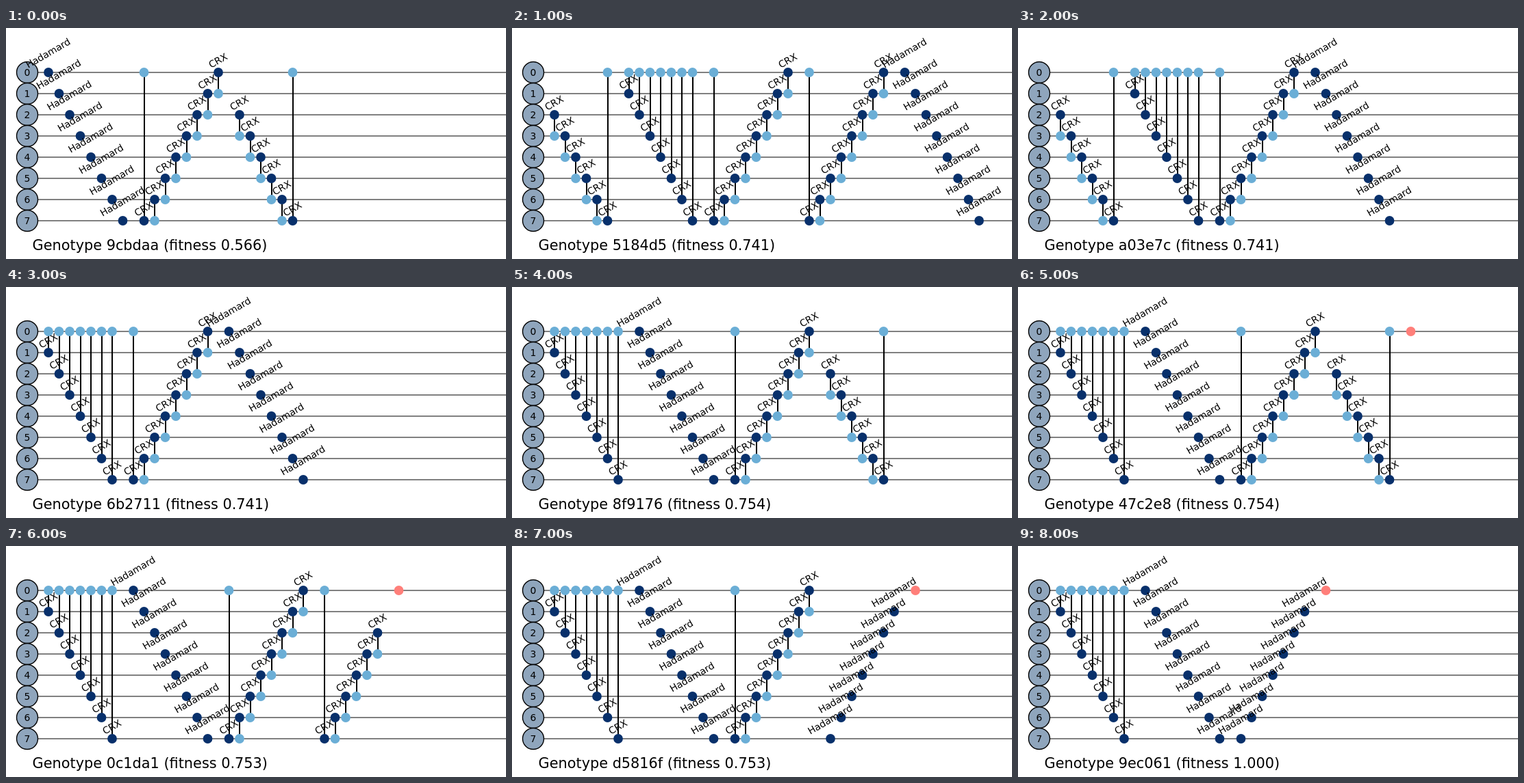
An HTML page for the animation above (9 s loop, 730 by 338 pixels).

```html
<!DOCTYPE html>
<html>
<head>
<meta charset="utf-8">
<style>
html, body { margin: 0; width: 100%; height: 100%; overflow: hidden; background: #fff; }
svg { display: block; width: 730px; height: 338px; }
text { font: 13.89px "DejaVu Sans", sans-serif; }
.title { font-size: 20.83px; }
</style>
</head>
<body>
<svg id="stage" viewBox="0 0 730 338"></svg>
<script>
const STEP = 1000;
const DARK = '#08306b', LIGHT = '#6baed6', RED = '#ff7f7a';
const stage = document.getElementById('stage');

// Blocks: first qubit, last qubit, gate kind
const BLOCKS = {
  H: [0, 7, 'Hadamard'],
  G: [7, 1, 'Hadamard'],
  D: [2, 7, 'CRX'],
  U: [7, 0, 'CRX'],
  V: [7, 2, 'CRX'],
  S: [1, 7, 'CRX', 0],   // every gate shares control qubit 0
  R: [0, 0, '']
};
const OFFSET = { Hadamard: -29.6, CRX: -10.6 };

const GENOTYPES = [
  ['HUD', '9cbdaa', '0.566'],
  ['DSUUH', '5184d5', '0.741'],
  ['DSUH', 'a03e7c', '0.741'],
  ['SUH', '6b2711', '0.741'],
  ['SHUD', '8f9176', '0.754'],
  ['SHUDR', '47c2e8', '0.754'],
  ['SHUVR', '0c1da1', '0.753'],
  ['SHUGR', 'd5816f', '0.753'],
  ['SHGR', '9ec061', '1.000']
];

const colX = k => 62 + 15.5 * k;
const rowY = q => 65 + 31 * q;
const dot = (x, y, fill) => `<circle cx="${x}" cy="${y}" r="6.9" fill="${fill}"/>`;
const line = (x1, y1, x2, y2, color) =>
  `<path d="M${x1} ${y1}L${x2} ${y2}" stroke="${color}" stroke-width="2"/>`;

function wires() {
  let out = '';
  for (let q = 0; q < 8; q++) {
    const y = rowY(q);
    out += line(31, y, 730, y, '#808080') +
      `<circle cx="31" cy="${y}" r="15.5" fill="#8fa5bc" stroke="#000" stroke-width="1.39"/>` +
      `<text x="31" y="${y + 5}" text-anchor="middle">${q}</text>`;
  }
  return out;
}

function circuit([blocks, hash, fitness]) {
  let links = '', dots = '', labels = '', k = 0;
  for (const id of blocks) {
    const [first, last, gate, control] = BLOCKS[id];
    const dir = Math.sign(last - first);
    const count = Math.abs(last - first) + 1;
    for (let i = 0; i < count; i++, k++) {
      const q = first + dir * i, x = colX(k), y = rowY(q);
      if (gate === 'CRX') {
        const cy = rowY(control ?? (q + 1) % 8);
        links += line(Math.round(x), y, Math.round(x), cy, '#000');
        dots += dot(x, cy, LIGHT);
      }
      dots += dot(x, y, gate ? DARK : RED);
      if (gate) labels +=
        `<text transform="translate(${x + OFFSET[gate]} ${y - 5.9}) rotate(-30)">${gate}</text>`;
    }
    k++; // gap between blocks
  }
  return links + dots + labels +
    `<text class="title" x="38.6" y="325">Genotype ${hash} (fitness ${fitness})</text>`;
}

const base = wires();
const start = performance.now();
let shown = -1;

function draw(now) {
  const i = Math.floor(Math.max(0, now - start) / STEP) % GENOTYPES.length;
  if (i !== shown) stage.innerHTML = base + circuit(GENOTYPES[shown = i]);
  requestAnimationFrame(draw);
}
draw(start);
</script>
</body>
</html>
```
